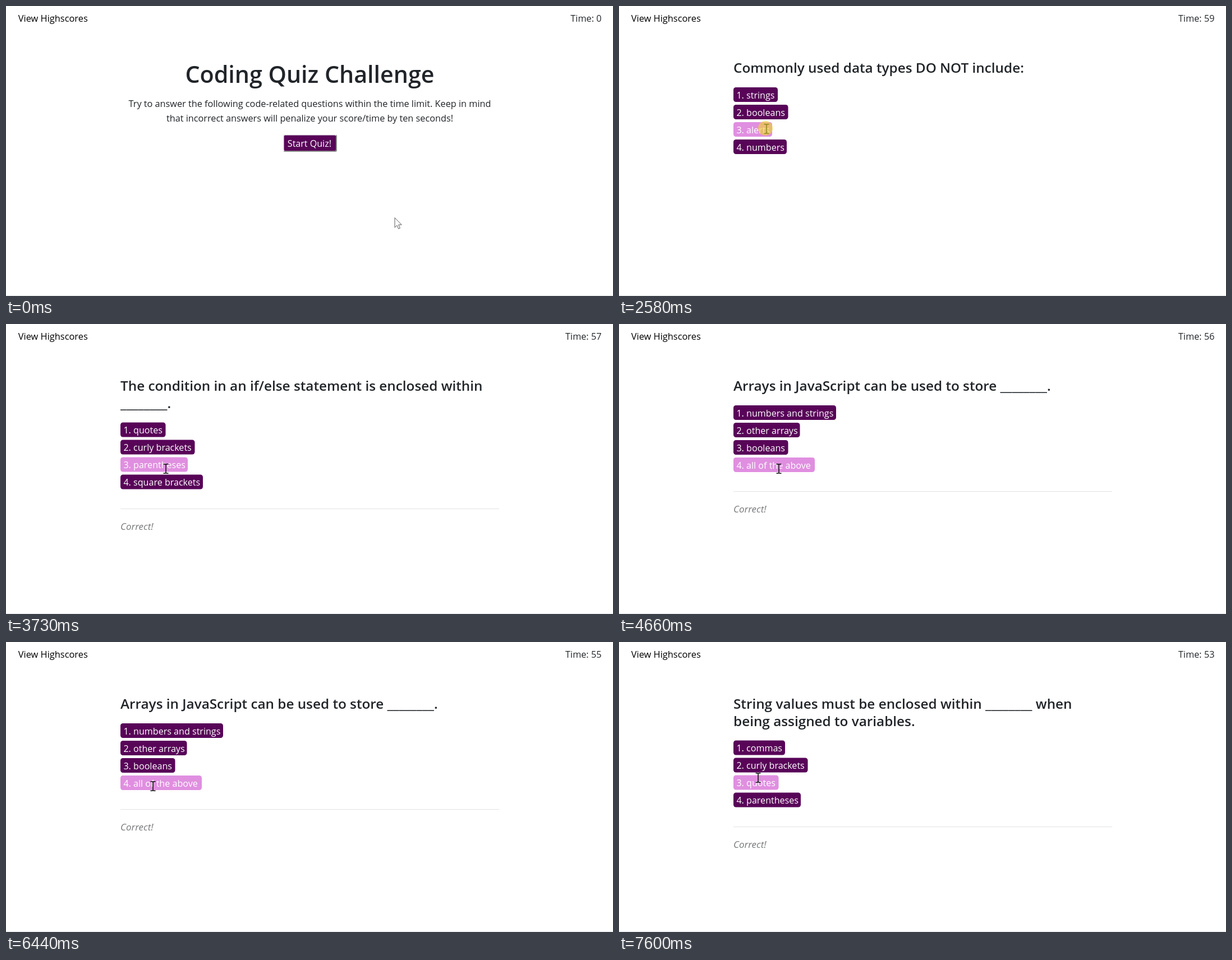
Animation of 1082 by 517 pixels, one loop 8 s. Source, as an HTML page:

```html
<!DOCTYPE html>
<html lang="en">
<head>
<meta charset="utf-8">
<title>Coding Quiz</title>
<style>
  html, body { margin: 0; width: 100%; height: 100%; overflow: hidden; background: #fff; }
  svg { display: block; width: 1082px; height: 517px; }
  text { font: 16.26px "Open Sans", "Noto Sans", sans-serif; fill: #212529; white-space: pre; }
  .title { font-size: 41.2px; font-weight: 600; }
  .question { font-size: 24.3px; font-weight: 600; }
  .mid { text-anchor: middle; }
  .end { text-anchor: end; }
  .nav { font-size: 16.4px; fill: #000; }
  .verdict { font-size: 17px; font-style: italic; fill: #757779; }
  .choice rect { fill: #580558; }
  .choice text { font-size: 16.1px; fill: #fff; }
  .choice.hover rect { fill: #e08fe0; }
</style>
</head>
<body>
<svg id="stage" viewBox="0 0 1082 517">
  <text class="nav" x="21.8" y="28">View Highscores</text>
  <text class="end" id="clock" x="1061.5" y="28"></text>
  <path d="M0 516.5H1082" stroke="#dee2e6"/>
  <g id="pages"></g>
  <path id="arrow" d="M.5 .5V17.8L4.4 14L7.2 20.2L9.9 19L7.2 13H12.7Z" fill="#fff" stroke="#333" stroke-width=".8"/>
  <path id="beam" d="M-4.5 -8.2H-1.2L0 -7.2L1.2 -8.2H4.5M0 -7.2V7.2M-4.5 8.2H-1.2L0 7.2L1.2 8.2H4.5" fill="none" stroke="#111" stroke-width="1.6"/>
  <circle id="press" r="13" fill="#edd828" fill-opacity=".6"/>
</svg>
<script>
const $ = id => document.getElementById(id);
const LEFT = 204, ROW = 31, ROW_H = 26;

const widths = {
  strings: 79, booleans: 97.5, alerts: 69, numbers: 95, quotes: 80.5,
  'curly brackets': 132.5, parentheses: 120, 'square brackets': 147,
  'numbers and strings': 183, 'other arrays': 118.5, 'all of the above': 145, commas: 92
};
const quiz = [
  [['Commonly used data types DO NOT include:'],
    ['strings', 'booleans', 'alerts', 'numbers']],
  [['The condition in an if/else statement is enclosed within', '________.'],
    ['quotes', 'curly brackets', 'parentheses', 'square brackets']],
  [['Arrays in JavaScript can be used to store ________.'],
    ['numbers and strings', 'other arrays', 'booleans', 'all of the above']],
  [['String values must be enclosed within ________ when', 'being assigned to variables.'],
    ['commas', 'curly brackets', 'quotes', 'parentheses']]
];

// Timeline, in ms
const LOOP = 8000;
const pageAt = [[0, 0], [1090, 1], [2650, 2], [4570, 3], [7460, 4]];
const clockAt = [[0, 0], [1600, 59], [2650, 58], [3600, 57], [4660, 56], [5600, 55], [6600, 54], [7600, 53]];
const presses = [[1010, 1090], [2580, 2650], [4430, 4570], [7280, 7460]];
const home = [693, 377];
// first step, last step, number of steps, destination
const moves = [
  [230, 780, 8, 533, 247], [1090, 1090, 1, 530, 244],
  [1250, 2020, 11, 261, 219], [2090, 2090, 1, 263, 219],
  [3190, 3730, 8, 285, 258],
  [5980, 6134, 3, 286, 297], [6211, 6440, 4, 262, 257], [6517, 6750, 4, 247, 235],
  [6820, 7060, 4, 248, 242]
];

function add(parent, tag, attrs, content) {
  const el = document.createElementNS('http://www.w3.org/2000/svg', tag);
  for (const key in attrs) el.setAttribute(key, attrs[key]);
  if (content) el.textContent = content;
  parent.append(el);
  return el;
}

const label = (parent, cls, x, y, content) => add(parent, 'text', { class: cls, x, y }, content);

function addChoice(page, x, y, width, height, pad, base, content) {
  const el = add(page.el, 'g', { class: 'choice' });
  add(el, 'rect', { x, y, width, height, rx: page.radius });
  label(el, '', x + pad, y + base, content);
  page.choices.push({ el, x, y, width, height });
}

const newPage = radius => ({ el: add($('pages'), 'g', {}), choices: [], radius });

function introPage() {
  const page = newPage(2);
  label(page.el, 'title mid', 541.5, 137, 'Coding Quiz Challenge');
  label(page.el, 'mid', 541.5, 180, 'Try to answer the following code-related questions within the time limit. Keep in mind');
  label(page.el, 'mid', 541.5, 206, 'that incorrect answers will penalize your score/time by ten seconds!');
  add(page.el, 'rect', { x: 494, y: 229, width: 96, height: 31, rx: 3, fill: '#8f8f8f' });
  add(page.el, 'path', { d: 'M494 260V232Q494 229 497 229H590L588 231H496V258Z', fill: '#efefef' });
  addChoice(page, 495.5, 230.5, 92.5, 27.5, 6.3, 20.5, 'Start Quiz!');
  return page;
}

function quizPage([lines, answers], index) {
  const page = newPage(4.5);
  const drop = (lines.length - 1) * 30.5;
  lines.forEach((line, i) => label(page.el, 'question', LEFT, 118.5 + i * 31, line));
  answers.forEach((answer, i) =>
    addChoice(page, LEFT, 145 + drop + i * ROW, widths[answer], ROW_H, 5.4, 19.7, `${i + 1}. ${answer}`));
  if (index) {
    const y = Math.round(298 + drop) + .5;
    add(page.el, 'path', { d: `M${LEFT} ${y}H879`, stroke: '#e2e3e4' });
    label(page.el, 'verdict', LEFT, y + 37.5, 'Correct!');
  }
  return page;
}

const pages = [introPage(), ...quiz.map(quizPage)];

const latest = (table, t) => table.filter(([start]) => t >= start).pop()[1];
const ease = p => (1 - Math.cos(Math.PI * p)) / 2;

function pointer(t) {
  let [x, y] = home;
  for (const [start, end, steps, toX, toY] of moves) {
    if (t < start) break;
    const gap = (end - start) / (steps - 1 || 1) || 1;
    const done = Math.min(steps, Math.floor((t - start) / gap + .001) + 1);
    const p = ease(done / steps);
    x += (toX - x) * p;
    y += (toY - y) * p;
  }
  return [x, y];
}

const show = (el, on) => { el.style.display = on ? '' : 'none'; };

function draw(t) {
  const [x, y] = pointer(t);
  const current = latest(pageAt, t);
  let overText = false;

  pages.forEach((page, i) => show(page.el, i === current));
  for (const c of pages[current].choices) {
    const over = x >= c.x && x < c.x + c.width && y >= c.y && y < c.y + c.height;
    c.el.classList.toggle('hover', over);
    overText = overText || (over && current > 0);
  }
  $('clock').textContent = 'Time: ' + latest(clockAt, t);

  const px = Math.round(x), py = Math.round(y);
  $('arrow').setAttribute('transform', `translate(${px - .5} ${py})`);
  $('beam').setAttribute('transform', `translate(${px} ${py})`);
  $('press').setAttribute('transform', `translate(${px - 2} ${py - 1})`);
  show($('arrow'), !overText);
  show($('beam'), overText);
  show($('press'), presses.some(([down, up]) => t >= down && t < up));
}

const began = performance.now();
function tick() {
  draw((performance.now() - began) % LOOP);
  requestAnimationFrame(tick);
}
tick();
</script>
</body>
</html>
```
